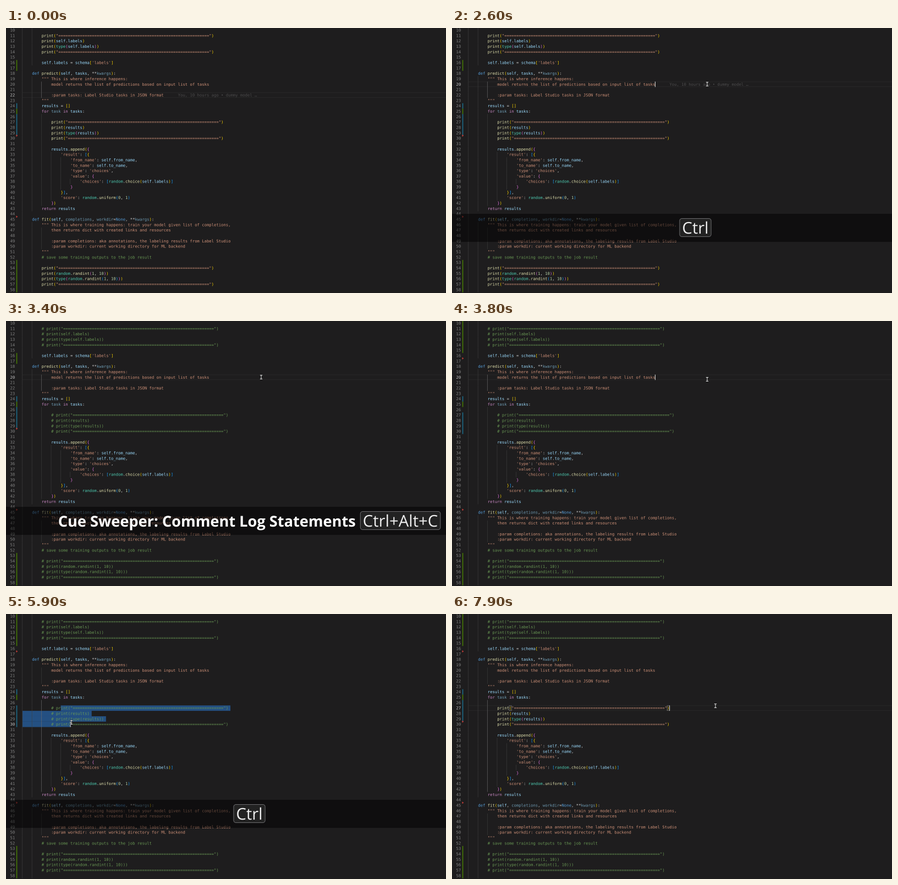
Write an HTML page with a canvas that moves like this. It is 800 px wide and 482 px high and loops after 8 s.

```html
<!DOCTYPE html>
<html lang="en">
<head>
<meta charset="utf-8">
<title>Comment log statements</title>
<style>
html, body { margin: 0; width: 100%; height: 100%; overflow: hidden; background: #1e1d1e; }
canvas { display: block; }
</style>
</head>
<body>
<canvas id="stage" width="800" height="482"></canvas>
<script>
// The scene is drawn at double size and scaled down, as a screen recording would be.
const W = 800, H = 482, ZOOM = 2;
const view = document.getElementById('stage').getContext('2d');
view.imageSmoothingQuality = 'high';
const buffer = document.createElement('canvas');
buffer.width = W * ZOOM;
buffer.height = H * ZOOM;
const ctx = buffer.getContext('2d');
ctx.scale(ZOOM, ZOOM);
ctx.textRendering = 'geometricPrecision';

const LOOP = 8000, STEP = 100;
const CW = 4.35, LH = 9.83, X0 = 30, FIRST = 10;
const MONO = '7.235px "DejaVu Sans Mono", monospace';
const UI = '"Open Sans", "Noto Sans", sans-serif';
const ADDED = '#487e02', CHANGED = '#1b6f8f', REMOVED = '#d8423c';
const BRACKETS = ['#ffd700', '#da70d6', '#179fff'];
const RULE = 'print("' + '='.repeat(63) + '")';
const BLAME = 'You, 10 hours ago • dummy model …';

// Each entry: indent level, then the text.
const SOURCE = [
  [], [2, RULE], [2, 'print(self.labels)'], [2, 'print(type(self.labels))'], [2, RULE],
  [], [2, "self.labels = schema['labels']"], [],
  [1, 'def predict(self, tasks, **kwargs):'],
  [2, '""" This is where inference happens:'],
  [3, 'model returns the list of predictions based on input list of tasks'],
  [], [3, ':param tasks: Label Studio tasks in JSON format'], [2, '"""'],
  [2, 'results = []'], [2, 'for task in tasks:'], [],
  [3, RULE], [3, 'print(results)'], [3, 'print(type(results))'], [3, RULE],
  [], [3, 'results.append({'], [4, "'result': [{"],
  [5, "'from_name': self.from_name,"], [5, "'to_name': self.to_name,"],
  [5, "'type': 'choices',"], [5, "'value': {"],
  [6, "'choices': [random.choice(self.labels)]"], [5, '}'], [4, '}],'],
  [4, "'score': random.uniform(0, 1)"], [3, '})'], [2, 'return results'], [],
  [1, 'def fit(self, completions, workdir=None, **kwargs):'],
  [2, '""" This is where training happens: train your model given list of completions,'],
  [3, 'then returns dict with created links and resources'], [],
  [3, ':param completions: aka annotations, the labeling results from Label Studio'],
  [3, ':param workdir: current working directory for ML backend'], [2, '"""'],
  [2, '# save some training outputs to the job result'], [],
  [2, RULE], [2, 'print(random.randint(1, 10))'], [2, 'print(type(random.randint(1, 10)))'],
  [2, RULE], []
];

function wordColor(word, next) {
  if (/^\d/.test(word)) return '#b5cea8';
  if (word === 'type' || word === 'random') return '#4ec9b0';
  if (/^(for|in|return)$/.test(word)) return '#c586c0';
  if (/^(def|None)$/.test(word)) return '#569cd6';
  if (/^(task|kwargs|completions|workdir)$/.test(word)) return '#6f9cb4';
  return next === '(' ? '#dcdcaa' : '#9cdcfe';
}

let depth = 0, inDoc = false;
function tokenize(text) {
  const quotes = text.includes('"""');
  if (quotes || inDoc) {
    if (quotes) inDoc = !inDoc;
    return [{ at: 0, text, color: '#ce9178' }];
  }
  if (text[0] === '#') return [{ at: 0, text, color: '#6a9955' }];
  return [...text.matchAll(/'[^']*'|"[^"]*"|\w+|./g)].map(m => {
    const s = m[0];
    let color = '#d4d4d4';
    if (/^['"]/.test(s)) color = '#ce9178';
    else if (/^\w/.test(s)) color = wordColor(s, text[m.index + s.length]);
    else if (/[([{]/.test(s)) color = BRACKETS[depth++ % 3];
    else if (/[)\]}]/.test(s)) color = BRACKETS[--depth % 3];
    return { at: m.index, text: s, color };
  });
}

const LINES = SOURCE.map(([level = 0, text = ''], i) => ({
  n: FIRST + i, level, text, tokens: tokenize(text), log: text.startsWith('print(')
}));
LINES.forEach((line, i) => {
  line.guides = line.level;
  if (line.text) return;
  const above = i ? LINES[i - 1].level : 2;
  const below = i < LINES.length - 1 ? LINES[i + 1].level : 2;
  line.guides = above < below ? above + 1 : below;
});

const colX = col => X0 + col * CW;
const midY = n => 4.1 + (n - FIRST) * LH;
const topY = n => midY(n) - LH / 2;

function fill(color, x, y, w, h) {
  ctx.fillStyle = color;
  ctx.fillRect(x, y, w, h);
}

function write(text, x, n, color) {
  ctx.fillStyle = color;
  for (const ch of text) {
    if (ch !== ' ') ctx.fillText(ch, x, midY(n) + 2.4);
    x += CW;
  }
}

const MOUSE = [
  [500, 470, 26], [1000, 466, 74], [1100, 466, 92], [1300, 464, 102], [3500, 464, 102],
  [3700, 464, 106], [3900, 464, 106], [4300, 240, 152], [4500, 99, 171], [4700, 104, 181],
  [4800, 110, 187], [5300, 118, 196], [5500, 119, 197], [7200, 119, 197], [7700, 479, 167],
  [LOOP, 479, 167]
];
function mouseAt(t) {
  const i = MOUSE.findIndex(p => p[0] > t);
  if (i < 1) return null;
  const [a, b] = [MOUSE[i - 1], MOUSE[i]];
  const k = (t - a[0]) / (b[0] - a[0]);
  return { x: a[1] + (b[1] - a[1]) * k, y: a[2] + (b[2] - a[2]) * k };
}

// Edits touch the text first, then the colours, then the gutter.
function logState(n, t) {
  const undone = n >= 27 && n <= 30 && t >= 7000;
  return { commented: t >= 2800 && !undone, stale: t < 3200 };
}

function caretAt(t) {
  if (t < 1400) return { line: 22, col: 59, since: -500 };
  if (t < 4500) return { line: 20, col: 78, since: t < 2800 ? 1400 : 2800 };
  if (t >= 7800) return { line: 27, col: 84, since: 7800 };
  const p = mouseAt(Math.max(4500, t - 100));
  const col = Math.round((p.x - X0) / CW) - (t >= 7000 ? 2 : 0);
  const line = FIRST + Math.round((p.y - midY(FIRST)) / LH);
  return { line, col, since: t < 5500 ? t : 5500, anchor: t >= 7000 ? 14 : 16 };
}

function drawGuides(caret) {
  const [from, to] = caret.line < 24 ? [20, 22] : [26, 42];
  for (const { n, guides } of LINES) {
    for (let g = 0; g < guides; g++) {
      const active = g === 2 && n >= from && n <= to;
      fill(active ? '#707070' : '#404040', colX(g * 4) - 0.5, topY(n), 0.6, LH);
    }
  }
}

function drawSelection(caret, t) {
  for (let n = 27; n <= caret.line; n++) {
    const line = LINES[n - FIRST];
    const shift = logState(n, t).commented ? 2 : 0;
    const start = n === 27 ? caret.anchor : 0;
    const end = n === caret.line ? caret.col : line.level * 4 + line.text.length + shift + 0.9;
    fill('#245082', colX(start), topY(n), (end - start) * CW, LH);
  }
}

function drawGutter(t) {
  const bar = (a, b, color) => fill(color, 18.8, topY(a), 1.5, (b - a + 1) * LH);
  const removed = n => {
    const y = topY(n);
    ctx.fillStyle = REMOVED;
    ctx.beginPath();
    ctx.moveTo(18.6, y - 2);
    ctx.lineTo(21.2, y);
    ctx.lineTo(18.6, y + 2);
    ctx.fill();
  };
  if (t < 3500) bar(16, 17, ADDED);
  else {
    bar(10, 15, ADDED);
    removed(17);
  }
  bar(24, 24, CHANGED);
  bar(25, 25, ADDED);
  if (t >= 3500 && t < 7500) bar(27, 30, CHANGED);
  else {
    bar(26, 29, CHANGED);
    removed(30);
  }
  removed(45);
  bar(53, 58, ADDED);
}

function drawLine(line, t) {
  let x = colX(line.level * 4);
  if (line.log) {
    const { commented, stale } = logState(line.n, t);
    if (commented && !stale) return write('# ' + line.text, x, line.n, '#6a9955');
    if (commented) {
      write('#', x, line.n, '#d4d4d4');
      x += 2 * CW;
    }
  }
  for (const k of line.tokens) write(k.text, x + k.at * CW, line.n, k.color);
}

function drawMouse(t) {
  if (t >= 4500 && t < 5500) {
    const p = mouseAt(Math.max(4500, t - 100));
    ctx.strokeStyle = '#d62222';
    ctx.lineWidth = 1.6;
    ctx.beginPath();
    ctx.arc(p.x + 1, p.y - 1, 4.5, 0, 7);
    ctx.stroke();
  }
  const p = mouseAt(t);
  if (!p) return;
  const beam = (color, pad) => {
    fill(color, p.x - 0.5 - pad, p.y - 4 - pad, 1 + 2 * pad, 8 + 2 * pad);
    for (const y of [-4, 3]) fill(color, p.x - 2.2 - pad, p.y + y - pad, 4.4 + 2 * pad, 1 + 2 * pad);
  };
  beam('#111', 0.4);
  beam('#f0f0f0', 0);
}

function shortcut(t) {
  if (t >= 2600 && t < 3600) {
    if (t < 2700) return ['', 'Ctrl'];
    if (t < 2800) return ['', 'Ctrl+Alt'];
    return ['Cue Sweeper: Comment Log Statements', 'Ctrl+Alt+C'];
  }
  if (t >= 5700 && t < 7700) {
    if (t < 6400) return ['', 'Ctrl'];
    if (t < 6900) return ['', 'Ctrl+Alt'];
    return ['Cue Sweeper: Uncomment Log Statements', 'Ctrl+Alt+U'];
  }
  return null;
}

function drawOverlay([label, keys]) {
  const labelFont = 'bold 27.2px ' + UI, keyFont = '29.3px ' + UI;
  const width = (text, font) => {
    ctx.font = font;
    return ctx.measureText(text).width;
  };
  fill('rgba(0,0,0,0.5)', 0, 338, W, 51);
  const labelW = label ? width(label, labelFont) + 8 : 0;
  const boxW = width(keys, keyFont) + 10;
  const x = 442.5 - (labelW + boxW) / 2;
  ctx.beginPath();
  ctx.roundRect(x + labelW + 0.5, 346.5, boxW - 1, 33, 4);
  ctx.fillStyle = 'rgba(128,128,128,0.17)';
  ctx.fill();
  ctx.strokeStyle = '#6c6c6e';
  ctx.lineWidth = 1;
  ctx.stroke();
  ctx.fillStyle = '#fff';
  ctx.font = labelFont;
  ctx.fillText(label, x, 374);
  ctx.fillStyle = '#eee';
  ctx.font = keyFont;
  ctx.fillText(keys, x + labelW + 5, 374);
}

function draw(t) {
  const caret = caretAt(t);
  fill('#1e1d1e', 0, 0, W, H);
  ctx.font = MONO;
  if (caret.anchor) drawSelection(caret, t);
  else {
    fill('#282828', X0, topY(caret.line), W, 1);
    fill('#282828', X0, topY(caret.line + 1) - 1, W, 1);
  }
  drawGuides(caret);
  drawGutter(t);
  for (const line of LINES) {
    write(String(line.n), 7.5, line.n, line.n === caret.line ? '#c6c6c6' : '#858585');
    drawLine(line, t);
  }
  if (t < 1400 || (t >= 1900 && t < 3200)) {
    write(BLAME, colX(caret.col + 6), caret.line, '#4d4c4d');
  }
  if (t >= 7800) {
    ctx.strokeStyle = '#888';
    ctx.lineWidth = 0.6;
    for (const col of [17, 83]) ctx.strokeRect(colX(col), topY(27) + 0.5, CW, LH - 1);
  }
  if ((t - caret.since) % 1000 < 500) {
    fill('#d0d0ce', colX(caret.col) - 0.4, topY(caret.line), 1.1, LH);
  }
  const keys = shortcut(t);
  if (keys) drawOverlay(keys);
  drawMouse(t);
  view.drawImage(buffer, 0, 0, W, H);
}

const start = performance.now();
let shown = -1;
function tick() {
  const t = Math.floor(((performance.now() - start) % LOOP) / STEP) * STEP;
  if (t !== shown) draw(shown = t);
  requestAnimationFrame(tick);
}
tick();
</script>
</body>
</html>
```
